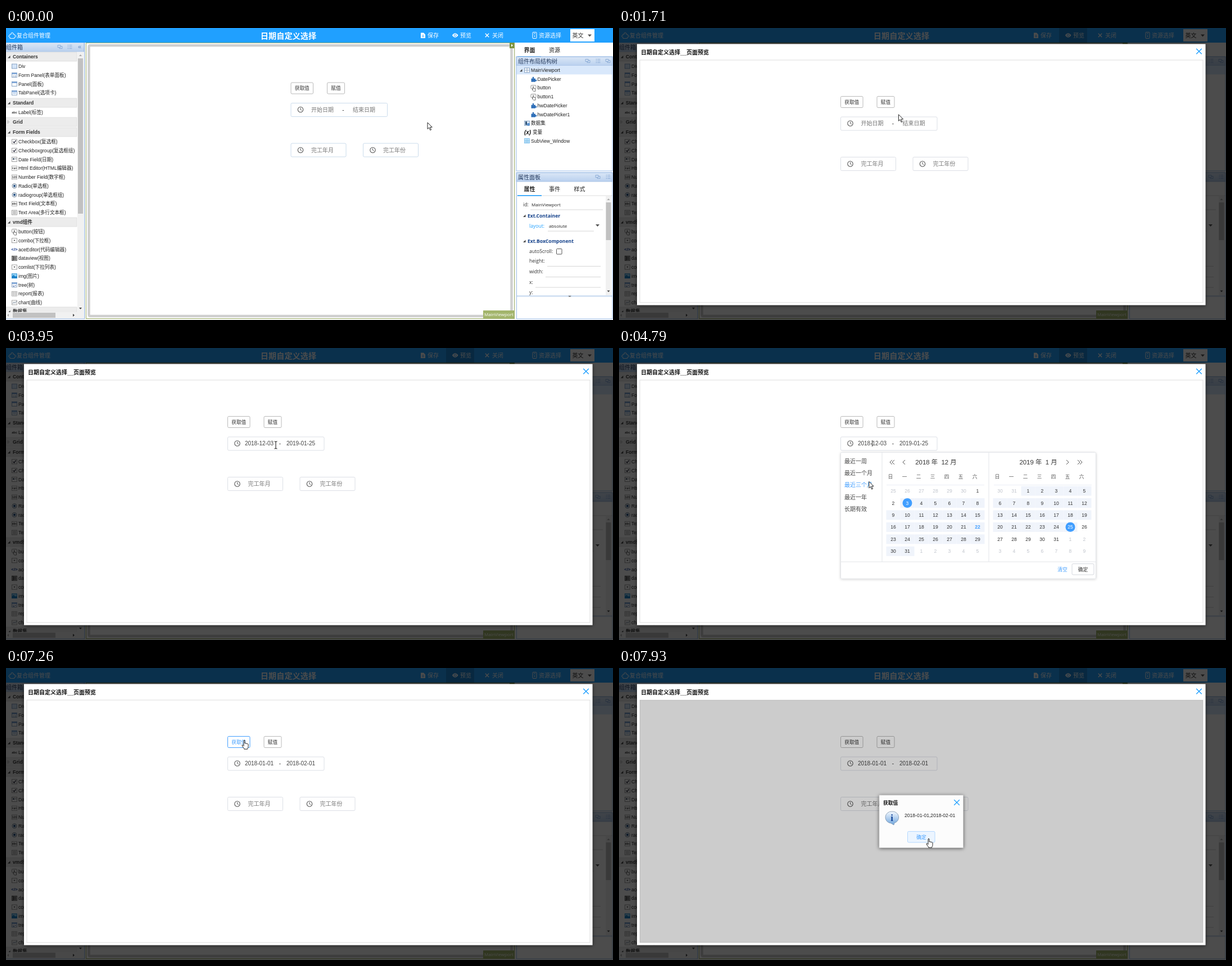
An HTML page that plays this animation: 1080x519 px, repeating every 8000 ms.

```html
<!DOCTYPE html>
<html lang="zh">
<head>
<meta charset="utf-8">
<title>日期自定义选择</title>
<style>
html, body { margin: 0; width: 100%; height: 100%; overflow: hidden; background: #fff; }
svg { display: block; width: 100%; height: 100%; }
text { font-family: "Liberation Sans", "Noto Sans CJK SC", "Noto Sans CJK", sans-serif; white-space: pre; }
.o { font-family: "Open Sans", "Noto Sans CJK SC", sans-serif; }
.b { font-weight: bold; }
.m { text-anchor: middle; }
</style>
</head>
<body>
<svg id="stage" viewBox="0 0 1080 519">
  <defs>
    <linearGradient id="head" x2="0" y2="1"><stop stop-color="#dbe7f6"/><stop offset="1" stop-color="#b9d0ee"/></linearGradient>
    <linearGradient id="ball" x2="0" y2="1"><stop stop-color="#f4f9ff"/><stop offset="1" stop-color="#6fa5dc"/></linearGradient>
    <filter id="soft" x="-10%" y="-10%" width="120%" height="120%"><feDropShadow dx="0" dy="1" stdDeviation="2" flood-opacity=".18"/></filter>
    <filter id="deep" x="-10%" y="-10%" width="120%" height="120%"><feDropShadow dx="0" dy="1" stdDeviation="3" flood-opacity=".6"/></filter>
  </defs>
</svg>
<script>
const stage = document.getElementById('stage');
const $ = id => document.getElementById(id);
const BLUE = '#409eff', TOP = '#20a0ff';

const text = (x, y, s, size = 8.6, fill = '#222', cls = '', extra = '') =>
  `<text x="${x}" y="${y + size * .36}" font-size="${size}" fill="${fill}" class="${cls}" ${extra}>${s}</text>`;
const rect = (x, y, w, h, fill, stroke = 'none', extra = '') =>
  `<rect x="${x}" y="${y}" width="${w}" height="${h}" fill="${fill}" stroke="${stroke}" ${extra}/>`;
const line = (d, stroke, w = 1, extra = '') =>
  `<path d="${d}" fill="none" stroke="${stroke}" stroke-width="${w}" ${extra}/>`;
const fill = (d, color, extra = '') => `<path d="${d}" fill="${color}" ${extra}/>`;
const at = (x, y, s) => `<g transform="translate(${x} ${y})">${s}</g>`;
const group = (id, s, extra = '') => `<g id="${id}" ${extra}>${s}</g>`;
const cross = (x, y, r, color, w = 1.2) =>
  line(`M${x - r} ${y - r}l${2 * r} ${2 * r}m0 ${-2 * r}l${-2 * r} ${2 * r}`, color, w);

// Small icons, drawn around 0,0
const frame = (inner = '', bg = '#fff', edge = '#6f8fb5') => rect(-4.5, -4, 9, 8, bg, edge, 'stroke-width=".8"') + inner;
const tag = s => frame(text(0, 0, s, 4.8, '#333', 'm b'), '#fff', '#999');
const strip = rect(-4.5, -4, 9, 2.4, '#7ba4d8');
const icons = {
  div: frame('', '#d4e4f8'),
  form: frame(strip + line('M-3 1h2m1 0h3M-3 3h2m1 0h3', '#6f8fb5', .8)),
  panel: frame(strip),
  tabs: frame(strip + rect(-3, -1, 6, 3, '#c5daf3')),
  abc: text(0, 0, 'abc', 5.5, '#333', 'm b'),
  check: frame(line('M-2.4 0l2 2l3-4.4', '#223', 1.3), '#fff', '#888'),
  date: frame(rect(-3, -2, 3, 2.4, '#456') + line('M1 -1h2.5', '#456', .8), '#fff', '#888'),
  html: tag('&lt;a&gt;'), num: tag('123'), field: tag('abc'),
  radio: '<circle r="4" fill="#e8eef5" stroke="#678" stroke-width=".9"/><circle r="2" fill="#234e80"/>',
  area: frame(line('M-3 -2h6m-6 2h6m-6 2h6', '#777', .8), '#fff', '#888'),
  button: rect(-4.5, -4.5, 9, 6, '#fff', '#777', 'rx="1" stroke-width=".8"') +
    fill('M-1 -2v5l-1-1v2l2 2h3.500v-4l-3-1v-3z', '#fff', 'stroke="#555" stroke-width=".8"'),
  combo: frame(fill('M-1.700 -1h3.400l-1.700 2z', '#333'), '#fff', '#888'),
  code: text(0, 0, '&lt;/&gt;', 8, '#1d3f8f', 'm b'),
  view: frame(line('M-3 -2h6m-6 2h6m-6 2h6M-2.500 -4v8', '#222', 1), '#ccc', '#333'),
  img: frame(fill('M-4.500 4v-3l3-3l3 3l1.500-1l1.500 1.500v2.500z', '#1780c8'), '#8fd0f5', '#1780c8'),
  tree: frame(strip + line('M-2 0v3h2m0-2h3', '#46a', .8)),
  report: frame(line('M-4 -1.500h8m-8 2.500h8M-1.500 -4v8m3-8v8', '#aaa', .7), '#f6f6f6', '#999'),
  chart: frame(line('M-3 2l2-3l2 2l3-4', '#789', .9), '#f4f4f4', '#999'),
  view4: frame(line('M-4 0h8M0 -4v8', '#6f8fb5', .8)),
  part: fill('M-4 -1h2.500q-1-3 1-3t1 3h3v2.500q2.500-.8 2.500 1t-2.500 1v1.500h-7.500z', '#2f6fb8'),
  data: frame(rect(-3, -3, 3, 6, '#357') + '<circle cx="2.500" cy="2" r="2.500" fill="#5a93d0"/>', '#dfeaf7'),
  vars: text(0, 0, '(x)', 10, '#111', 'm b', 'font-style="italic"'),
  win: frame(line('M-4 -1h8m-8 2.500h8M-1.500 -4v8m3-8v8', '#5ab0e8', .8), '#e9f5fd', '#5ab0e8')
};

const panelHead = (x, y, w, s, tools) => rect(x, y, w, 16, 'url(#head)', '#9fbbe0', 'stroke-width=".7"') +
  text(x + 3 - (x < 5 ? 3 : 0), y + 8, s, 10, '#243a5e') + tools.map(([tx, kind]) => at(tx, y + 7.5,
    kind === '«' ? text(0, -.5, '«', 11, '#5e87bd', 'm') :
    kind === 'l' ? line('M-3.500 -3h2m1 0h5m-8 3h2m1 0h5m-8 3h2m1 0h5', '#86a8d4', .9) :
    line('M-4 -3h5v4h-5zM-1 1v2h5v-4h-3', '#86a8d4', .9))).join('');

const arrowTri = (x, y, open) => open ? fill(`M${x} ${y + 2.5}h4.500v-4.500z`, '#444') : line(`M${x} ${y - 2.5}l3 2.500l-3 2.500z`, '#aaa', .8);

function sidebar() {
  const sections = [
    [51, 'Containers', 'Div,div|Form Panel(表单面板),form|Panel(面板),panel|TabPanel(选项卡),tabs'],
    [133, 'Standard', 'Label(标签),abc'],
    [167, 'Grid', ''],
    [185, 'Form Fields', 'Checkbox(复选框),check|Checkboxgroup(复选框组),check|Date Field(日期),date|Html Editor(HTML编辑器),html|Number Field(数字框),num|Radio(单选框),radio|radiogroup(单选框组),radio|Text Field(文本框),field|Text Area(多行文本框),area'],
    [345, 'vmd组件', 'button(按钮),button|combo(下拉框),combo|aceEditor(代码编辑器),code|dataview(视图),view|comlist(下拉列表),combo|img(图片),img|tree(树),tree|report(报表),report|chart(曲线),chart'],
    [504, '数据集', '']
  ];
  const list = sections.map(([y, title, items]) =>
    rect(0, y - 8, 126, 16, '#ececec', '#d8d8d8', 'stroke-width=".7"') + arrowTri(3, y, title !== 'Grid') +
    text(12, y, title, 8.6, '#333', 'b') +
    (items && items.split('|').map((item, i) => {
      const [label, icon] = item.split(','), cy = y + 17 + 15.75 * i;
      return at(15, cy, icons[icon]) + text(22, cy, label);
    }).join(''))).join('');
  return rect(0, 26, 139, 491, '#fff') +
    `<svg width="139" height="505" viewBox="0 0 139 505">${list}</svg>` +
    panelHead(0, 26, 139, '组件箱', [[96, 'c'], [113, 'l'], [131, '«']]) +
    rect(127, 43, 11, 462, '#f1f1f1') + rect(128, 54, 9, 276, '#c1c1c1') +
    fill('M130 50h5l-2.500-3z', '#aaa') + fill('M130 497h5l-2.500 3z', '#444') +
    rect(0, 505, 138, 11, '#f1f1f1') + rect(12, 506, 76, 9, '#c1c1c1') +
    fill('M5 508v5l-3-2.500z', '#aaa') + fill('M119 508v5l3-2.500z', '#444') +
    line('M139.500 26V517H0', '#8fb0dc');
}

function rightSide() {
  const tree = 'MainViewport,view4|DatePicker,part|button,button|button1,button|hwDatePicker,part|hwDatePicker1,part|数据集,data|变量,vars|SubView_Window,win';
  const rows = tree.split('|').map((row, i) => {
    const [label, icon] = row.split(','), y = 75 + 15.7 * i, deep = i > 0 && i < 6;
    return at(deep ? 938.5 : icon === 'vars' ? 928 : 927, y, icons[icon]) +
      text(deep ? 945.5 : icon === 'vars' ? 937 : 934, y, label);
  }).join('');
  const prop = (y, label, x, x1, value = '') => text(931, y, label, 8.6, '#333', 'o') +
    text(x + 1, y, value, 8, '#222', 'o') + line(`M${x} ${y + 9.5}H${x1}`, '#ccc', .8);
  const tabs = (y, names, w) => names.map((s, i) => text(931.5 + 44.5 * i, y, s, 10, '#222', i ? 'm' : 'm b')).join('') +
    rect(910, y + 10.5, w, 1.6, TOP);
  return rect(907, 26, 173, 493, '#fff') + tabs(39.5, ['界面', '资源'], 42) +
    panelHead(908, 51, 171, '组件布局结构树', [[1035, 'c'], [1053, 'l'], [1071, 'c']]) +
    rect(908, 67, 171, 15.5, '#d9e8fb') + arrowTri(914, 75, true) + rows +
    rect(908, 51, 171, 203, 'none', '#99bbe8') +
    panelHead(908, 257, 171, '属性面板', [[1053, 'c'], [1071, 'l']]) +
    line('M908 298H1079', '#ddd') + tabs(286.5, ['属性', '事件', '样式'], 43) +
    text(920, 314, 'id:', 8.6, '#333', 'o') + text(935, 314, 'MainViewport', 8, '#222', 'o') + line('M933 323H1062', '#ccc', .8) +
    arrowTri(920, 333.5, true) + text(928, 333.5, 'Ext.Container', 8.6, '#15428b', 'o b') +
    text(931, 351.5, 'layout:', 8.6, TOP, 'o') + text(966, 352, 'absolute', 8, '#222', 'o') +
    line('M964 361H1046', '#ccc', .8) + fill('M1049 349h7l-3.500 4z', '#555') +
    arrowTri(920, 378.5, true) + text(928, 378.5, 'Ext.BoxComponent', 8.6, '#15428b', 'o b') +
    text(931, 396.5, 'autoScroll:', 8.6, '#333', 'o') + rect(979.5, 392.5, 9.5, 9.5, '#fff', '#555', 'rx="1"') +
    prop(414, 'height:', 963, 1058) + prop(433, 'width:', 960, 1058) + prop(451.5, 'x:', 942, 1058) +
    text(931, 470, 'y:', 8.6, '#333', 'o') +
    rect(1067, 299, 10, 176, '#f1f1f1') + rect(1067.5, 310, 9, 67, '#c1c1c1') +
    fill('M1069.500 306h5l-2.500-3z', '#aaa') + fill('M1069.500 466.500h5l-2.500 3z', '#444') +
    rect(908, 475, 171, 3, '#d5e3f4') + fill('M1000 476h6l-3 2z', '#666') +
    rect(908.5, 257, 170.5, 260, 'none', '#99bbe8');
}

function topbar() {
  const label = (x, s) => text(x, 13, s, 10, '#fff');
  return rect(0, 0, 1080, 26, TOP) + group('topHover', rect(783, 0, 50, 26, '#1b88d9')) +
    line('M7 11h2.500q-1-3 1.500-3t1.500 3h2.500v2q3-.5 3 1.500t-3 1.500v2.500h-8v-2.500q-2.500 0-2.500-1.500t2.500-1.500z', '#fff', .9) +
    label(19, '复合组件管理') + text(502.5, 13.5, '日期自定义选择', 14.2, '#fff', 'm b') +
    fill('M738 8.500h5l3 3v6.500h-8z', '#fff') + line('M740 13h4m-4 2.500h4', TOP, 1) + label(750, '保存') +
    fill('M794 13q5-7.500 10.500 0q-5.500 7.500-10.500 0z', '#fff') + `<circle cx="799.200" cy="13" r="2" fill="#fff" stroke="${TOP}"/>` +
    label(808, '预览') + cross(856, 13, 3.2, '#fff', 1.4) + label(865, '关闭') +
    rect(937, 7.5, 7, 11, 'none', '#fff', 'rx="1"') + line('M939 10h3m-1.500 3v3', '#fff') + label(948, '资源选择') +
    rect(1004, 2, 43, 22, '#fff') + text(1007.5, 13, '英文', 10, '#333') + fill('M1035 11.500h7l-3.500 4z', '#555');
}

const clock = (x, y) => `<circle cx="${x}" cy="${y}" r="4.700" fill="none" stroke="#555" stroke-width="1.100"/>` +
  line(`M${x} ${y - 3}v3l2.300 1.500`, '#555');

function fields(edge, p) {
  const box = (x, y, w) => rect(x, y, w, 24, '#fff', edge, 'rx="2"');
  const button = (id, x, w, s) => group(p + id, rect(x, 97, w, 20, '#fff', '#b9b9b9', 'rx="2"') + text(x + w / 2, 107, s, 8.7, '#333', 'm'));
  const value = (id, x, s) => text(x, 145, s, 10, '#777', 'm', `id="${p}${id}"`);
  return button('get', 507, 39.5, '获取值') + button('set', 571.5, 31, '赋值') +
    box(507, 133.5, 171.5) + clock(524, 145) + value('from', 563, '开始日期') + text(600, 145, '-', 10, '#333', 'm') + value('to', 637, '结束日期') +
    box(507, 205, 98) + clock(524, 217) + text(563, 217, '完工年月', 10, '#777', 'm') +
    box(635.5, 205, 98) + clock(652.5, 217) + text(691, 217, '完工年份', 10, '#777', 'm');
}

const editor = () => rect(139, 26, 768, 493, '#f4f6f2') + rect(142.5, 26.5, 762, 490, '#fff', '#9fae6c') +
  rect(147.5, 31, 752, 481, '#fff', '#cfcfcf', 'stroke-width="4.500" rx="2"') +
  rect(896, 26, 8.5, 10, '#7f9440') + fill('M899 28.500v5l3-2.500z', '#fff') +
  rect(849, 502, 55.5, 14.5, '#a3b56c') + text(851, 509.5, 'MainViewport', 8, '#fff', 'o');

// Day cells: ordinal counts from 1 December
const ROW = 21.45, COL = 25;
const months = [{ x: 488, shift: -5, prev: 30, len: 31, base: 0 }, { x: 678, shift: -1, prev: 31, len: 31, base: 31 }];

function days(from, to) {
  return months.map(m => Array.from({ length: 42 }, (_, i) => {
    const d = i + m.shift, x = m.x + i % 7 * COL, y = 254 + Math.floor(i / 7) * ROW;
    if (d < 1 || d > m.len) return text(x, y, d < 1 ? d + m.prev : d - m.len, 8.6, '#c0c4cc', 'm');
    const n = d + m.base, end = from && (n === from || n === to), inside = from && n >= from && n <= to;
    const today = n === 22;
    return (inside ? rect(x - 12.5, y - 8.5, COL, 17, '#f0f4fb') : '') +
      (end ? `<circle cx="${x}" cy="${y}" r="8.500" fill="${BLUE}"/>` : '') +
      text(x, y, d, 8.6, end ? '#fff' : today ? BLUE : '#333', today ? 'm b' : 'm');
  }).join('')).join('');
}

function calendar() {
  const chev = (x, dir, n) => Array.from({ length: n }, (_, i) =>
    line(`M${x + i * 4 - (n - 1) * 2 + 2 * dir} 199l${-4 * dir} 4l${4 * dir} 4`, '#555')).join('');
  return rect(394.5, 185.5, 454, 224.5, '#fff', '#e2e4e8', 'rx="2" filter="url(#soft)"') +
    line('M468 186V380M658 186V380M395 380H848', '#e2e4e8') + line('M476 243.500H650M667 243.500H841', '#ebeef5') +
    ['最近一周', '最近一个月', '最近三个月', '最近一年', '长期有效'].map((s, i) =>
      text(401, 201 + 21.4 * i, s, 10, '#444', '', `id="quick${i}"`)).join('') +
    chev(486, 1, 2) + chev(507, 1, 1) + chev(798, -1, 1) + chev(820, -1, 2) +
    text(564, 203, '2018 年  12 月', 11.4, '#333', 'm') + text(746, 203, '2019 年  1 月', 11.4, '#333', 'm') +
    months.map(m => [...'日一二三四五六'].map((s, i) => text(m.x - 5 + i * COL, 228.5, s, 8.6, '#555', 'm')).join('')).join('') +
    group('days', '') + text(789, 393.5, '清空', 8.8, BLUE, 'm') +
    group('ok', rect(806, 383.5, 39, 19.5, '#fff', '#d5d8de', 'rx="2"') + text(825.5, 393.5, '确定', 8.8, '#333', 'm'));
}

const message = () => rect(37, 57, 1002, 431, '#000', 'none', 'opacity=".2"') +
  rect(463, 226, 149.5, 93.5, '#fcfcfc', '#bbb', 'stroke-width=".5" filter="url(#deep)"') +
  text(470, 239.5, '获取值', 8.7, '#111', 'b') + cross(601, 239, 4.8, TOP, 1.3) +
  `<path d="M486 255a11 10.500 0 0 1 4 20.500l-1 3.500l-5-3a11 10.500 0 0 1 2-21z" fill="url(#ball)" stroke="#7d93ad" stroke-width=".8"/>` +
  `<text x="485.500" y="271.500" font-size="17" fill="#14469a" class="m b" style="font-family:'Liberation Serif',serif">i</text>` +
  text(508, 261.5, '2018-01-01,2018-02-01', 8.6, '#222') +
  group('yes', rect(513.5, 290.5, 48.5, 19.5, '#fff', '#d5d8de', 'rx="2"') + text(538, 300.5, '确定', 8.8, '#333', 'm'));

const preview = () => rect(0, 0, 1080, 519, '#000', 'none', 'opacity=".7"') +
  rect(32, 28.5, 1011.5, 464, '#fff', 'none', 'filter="url(#deep)"') +
  text(39, 43, '日期自定义选择__页面预览', 10, '#111', 'b') + cross(1032, 41.5, 4.8, TOP, 1.4) +
  rect(37, 57, 1002, 431, '#fff', '#ddd') +
  group('page', at(-112.5, 24.5, fields('#dcdfe6', 'p')) + line('M450.500 164v11', '#222', 1, 'id="caret"')) +
  group('cal', calendar()) + group('msg', message());

const cursor = (id, d) => group(id, fill(d, '#fff', 'stroke="#222" stroke-width="1" stroke-linejoin="round"'));
const cursors = cursor('a', 'M0 0v11.500l2.700-2.500l2 4.600l1.900-.8l-2-4.500h3.600z') +
  cursor('h', 'M-1 1q1-1.800 2 0v5q1-1 2 .300q1.200-.800 2 .500q1.500-.600 2 .800v4q0 2-1.300 3.600v1h-6v-1q-1.500-1.500-3.700-5.200q0-1.800 1.700-.800l1.300 1.300z') +
  group('i', line('M-2.500 -6q2 0 2.500 1q.5-1 2.500-1M0 -5V6M-2.500 7q2 0 2.500-1q.5 1 2.500 1', '#222', 1.1));

stage.insertAdjacentHTML('beforeend', editor() + fields('#cbdcec', 'e') + sidebar() + rightSide() + topbar() +
  group('preview', preview()) + group('cursor', cursors));

// Bursts of picture changes: start, end, steps
const bursts = [[120, 1050, 8], [1170, 2100, 8], [2220, 3190, 8], [3500, 4490, 8], [4640, 5600, 8], [5720, 6110, 4], [6420, 7380, 8], [7530, 7930, 4]];
function snap(t) {
  let out = 0;
  for (const [a, b, n] of bursts) if (t >= a) {
    const step = (b - a) / (n - 1);
    out = a + Math.min(n - 1, Math.floor((t - a) / step + 1e-6)) * step;
  }
  return out;
}

// Pointer: time, x, y, shape
const path = [
  [0, 750, 168, 'a'], [600, 817, 21, 'h'], [920, 817, 21, 'h'], [1050, 793, 40, 'a'], [1900, 450, 172, 'i'], [2220, 450, 172, 'i'],
  [2490, 514, 276, 'h'], [2640, 514, 276, 'h'], [2910, 805, 317, 'h'], [2930, 805, 317, 'h'], [3190, 825, 392, 'h'], [3500, 825, 392, 'a'],
  [3920, 480, 172, 'i'], [4400, 480, 172, 'a'], [5000, 429, 267, 'h'], [5600, 429, 267, 'h'], [6110, 483, 130, 'h'], [6420, 483, 130, 'h'],
  [7100, 424, 128, 'h'], [7260, 424, 128, 'h'], [7380, 472, 186, 'a'], [7930, 551, 303, 'h']
];
function pointer(t) {
  let i = path.length - 1;
  while (path[i][0] > t + .01) i--;
  const a = path[i], b = path[i + 1] || a;
  let k = b === a ? 0 : (t - a[0]) / (b[0] - a[0]);
  k = k * k * (3 - 2 * k);
  return { x: a[1] + (b[1] - a[1]) * k, y: a[2] + (b[2] - a[2]) * k, shape: a[3] };
}

const within = (t, a, b) => t >= a && t < b;
const ramp = (t, a, b) => Math.max(0, Math.min(1, (t - a) / (b - a)));
const show = (id, on) => { $(id).style.display = on ? '' : 'none'; };
function hot(id, on, edge, bg = '#fff', idle = '#333') {
  const [box, label] = $(id).children;
  box.setAttribute('stroke', on ? BLUE : edge);
  box.setAttribute('fill', on ? bg : '#fff');
  label.setAttribute('fill', on ? BLUE : idle);
}
function setValue(id, s, empty) {
  $(id).textContent = s || empty;
  $(id).setAttribute('fill', s ? '#444' : '#777');
}

function hoverDay({ x, y }) {
  const m = x < 660 ? months[0] : months[1];
  const col = Math.max(0, Math.min(6, Math.round((x - m.x) / COL)));
  return Math.max(3, Math.round((y - 254) / ROW) * 7 + col + m.shift + m.base);
}

let drawn = '';
function draw(now) {
  const t = snap(now % 8000), p = pointer(t);
  show('topHover', t >= 500);
  show('preview', t >= 700);
  show('page', t >= 1170);
  show('caret', within(t, 2090, 3500) || within(t, 4200, 5200));

  const open = ramp(t, 2120, 2340) * (1 - ramp(t, 3430, 3760)) + ramp(t, 4120, 4340) * (1 - ramp(t, 5200, 5440));
  show('cal', open > 0);
  $('cal').setAttribute('opacity', open);
  $('cal').setAttribute('transform', `translate(0 ${185 * (1 - open)}) scale(1 ${open})`);
  const range = t < 2600 ? [0, 0] : [3, t < 2900 ? hoverDay(p) : 56];
  if (drawn !== range.join()) {
    $('days').innerHTML = days(...range);
    drawn = range.join();
  }
  for (let i = 0; i < 5; i++)
    $('quick' + i).setAttribute('fill', t > 4640 && Math.abs(p.y - 201 - 21.4 * i) < 10 ? BLUE : '#444');
  hot('ok', within(t, 3150, 3800), '#d5d8de');

  const dates = t < 3500 ? [] : t < 5180 ? ['2018-12-03', '2019-01-25'] :
    t < 6420 ? ['2017-12-22', '2018-12-22'] : ['2018-01-01', '2018-02-01'];
  setValue('pfrom', dates[0], '开始日期');
  setValue('pto', dates[1], '结束日期');
  hot('pset', within(t, 5960, 6600), '#b9b9b9');
  hot('pget', within(t, 6900, 7370), '#b9b9b9');
  show('msg', t >= 7370);
  hot('yes', t >= 7900, '#d5d8de', '#ecf5ff');
  if (t >= 7900) $('yes').firstChild.setAttribute('stroke', '#b3d8ff');

  for (const s of 'ahi') show(s, s === p.shape);
  $('cursor').setAttribute('transform', `translate(${p.x} ${p.y})`);
}

const began = performance.now();
function loop() {
  draw(performance.now() - began);
  requestAnimationFrame(loop);
}
loop();
</script>
</body>
</html>
```
